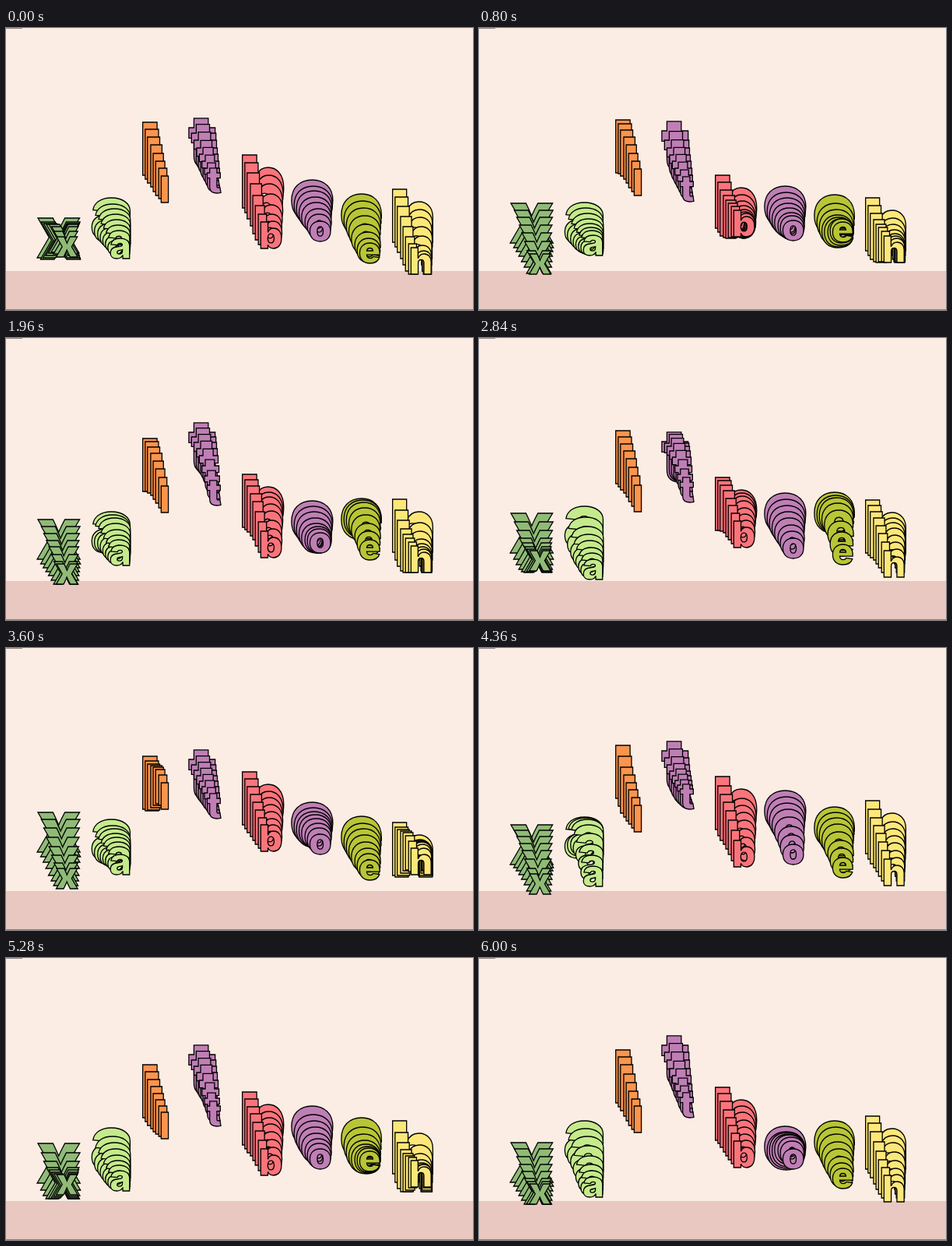
Animation, 600 px wide and 362 px high, one loop 6.04 s. Source, as an HTML page with a canvas:

```html
<!DOCTYPE html>
<html lang="en">
<head>
<meta charset="utf-8">
<title>Bouncing letters</title>
<style>
  html, body { margin: 0; width: 100%; height: 100%; overflow: hidden; background: #fcede4; }
  canvas { display: block; }
</style>
</head>
<body>
<canvas id="stage" width="600" height="362"></canvas>
<script>
const ctx = document.getElementById('stage').getContext('2d');
const LOOP = 6040, STEP = 40, FLOOR = 316;
const LAYERS = 8, SIZE = 94, SHRINK = 0.5, SHIFT = 24;
const DROP = 30;   // how far the front layer hangs below the back one
const SWAY = 18;   // largest vertical swing
const BEAT = 300;  // ms between two random heights
const LAG = 50;    // ms each layer trails the one in front

// x: left edge, y: resting baseline of the back layer
const letters = [
  { ch: 'x', x: 40,  y: 279, color: '#8fbb76' },
  { ch: 'a', x: 110, y: 269, color: '#c5ea8c' },
  { ch: 'l', x: 175, y: 191, color: '#fc944d' },
  { ch: 't', x: 234, y: 180, color: '#bf7fb5' },
  { ch: 'b', x: 303, y: 241, color: '#fb747b' },
  { ch: 'o', x: 366, y: 252, color: '#bf7fb5' },
  { ch: 'e', x: 430, y: 257, color: '#b8c536' },
  { ch: 'h', x: 496, y: 275, color: '#fde779' }
];

const mix = (a, b, k) => a + (b - a) * k;

function random(seed) {
  const s = Math.sin(seed * 12.9898) * 43758.5453;
  return s - Math.floor(s);
}

// Smooth random wave between -1 and 1
function wave(seed, t) {
  const beat = Math.floor(t / BEAT);
  const u = t / BEAT - beat;
  const height = n => 2 * random(seed * 101 + n) - 1;
  return mix(height(beat), height(beat + 1), u * u * (3 - 2 * u));
}

function drawLetter({ ch, x, y, color }, index, t) {
  ctx.fillStyle = color;
  for (let i = 0; i < LAYERS; i++) {
    const k = i / (LAYERS - 1);
    const sway = SWAY * wave(index + 1, t + i * LAG);
    const base = Math.min(y + DROP * k + sway, FLOOR);
    ctx.font = `900 ${SIZE * mix(1, SHRINK, k)}px Inter, sans-serif`;
    const left = x + SHIFT * k + ctx.measureText(ch).actualBoundingBoxLeft;
    ctx.fillText(ch, left, base);
    ctx.strokeText(ch, left, base);
  }
}

function rect(color, x, y, w, h) {
  ctx.fillStyle = color;
  ctx.fillRect(x, y, w, h);
}

function draw(now) {
  const t = Math.floor(now % LOOP / STEP) * STEP;
  rect('#fcede4', 0, 0, 600, 362);
  rect('#e8c8c0', 0, 312, 600, 50);
  rect('#8d8583', 0, 0, 21, 1);
  rect('#8d7d79', 0, 361, 600, 1);

  ctx.strokeStyle = '#000';
  ctx.lineWidth = 1.3;
  ctx.miterLimit = 3;
  letters.forEach((letter, i) => drawLetter(letter, i, t));
}

let start;
function frame(now) {
  start ??= now;
  draw(now - start);
  requestAnimationFrame(frame);
}
requestAnimationFrame(frame);
</script>
</body>
</html>
```
